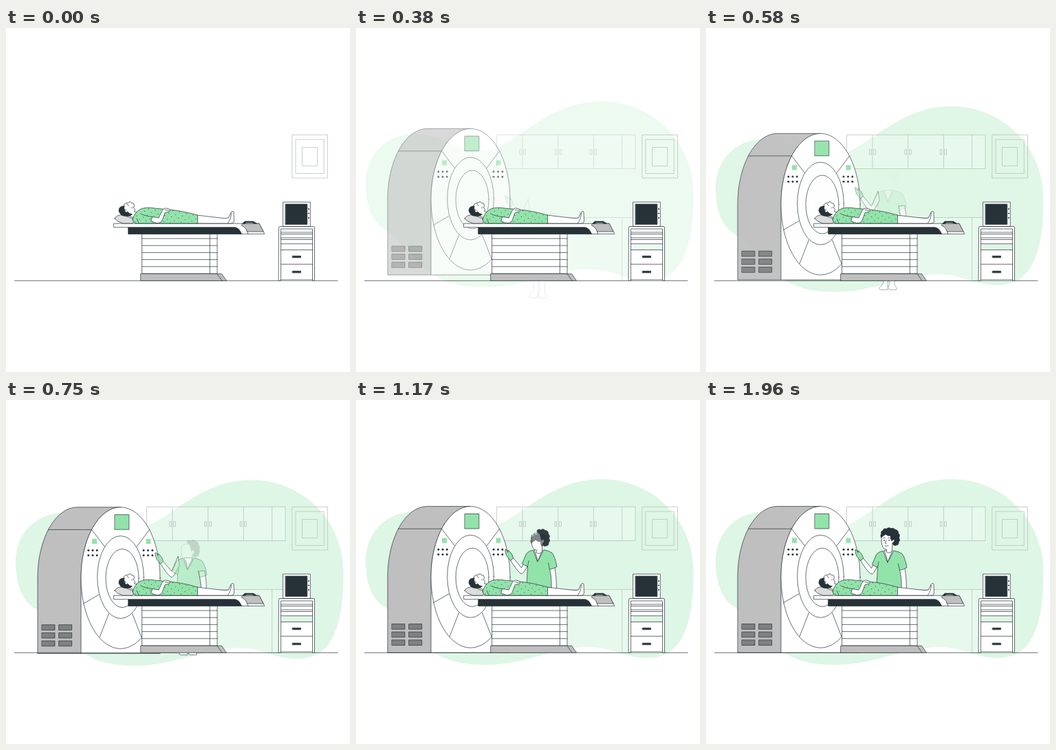
An HTML page for the animation above (2000 ms loop, 500 by 500 pixels).

```html
<!DOCTYPE html>
<html lang="en">
<head>
<meta charset="utf-8">
<title>Scanner room</title>
<style>
html, body { margin: 0; width: 100%; height: 100%; overflow: hidden; background: #fff; }
svg { display: block; width: 100vw; height: 100vh; }
.line { fill: none; stroke: #263238; stroke-width: .7; stroke-linecap: round; stroke-linejoin: round; }
.white { fill: #fff; }
.green { fill: #92e3a9; }
.grey { fill: #bfbfbf; }
.mid { fill: #808080; }
.dark { fill: #263238; }
.pale { fill: none; stroke: #bac4be; stroke-width: .8; }
.veil { fill: #fff; fill-opacity: .25; }
</style>
</head>
<body>
<svg viewBox="0 0 500 500">
  <defs>
    <pattern id="dots" width="10" height="9" patternUnits="userSpaceOnUse" patternTransform="rotate(12)">
      <rect class="green" width="10" height="9"/>
      <circle class="dark" cx="2.5" cy="2.5" r=".6"/>
      <circle class="dark" cx="7.5" cy="7" r=".6"/>
    </pattern>
  </defs>

  <g id="blob">
    <path fill="#def6e5" d="M14 237C13 194 42 162.500 86 162.500C124 162.500 147 187 181 187C231 186.500 272 115 357 115C432 115 490.500 175 490.500 249C490.500 319 478 375 424 375C389 375 371 358 335 359C282 361 246 385 186 385C145 385 116 374 91 350C72 331 61 313 43 302C24 291 15 269 14 237Z"/>
  </g>

  <g id="room" class="pale">
    <path class="veil" d="M204.500 155.300H406V204.500H204.500ZM205 275.500H403V367H205Z" stroke="none"/>
    <path d="M204.500 155.300H406V204.500H204.500ZM242 155V204.500M293.700 155V204.500M345.400 155V204.500M386.700 155V204.500M283 275.500H403M386.700 275.500V367"/>
    <g id="knobs"></g>
  </g>

  <path class="pale" d="M415.800 155.300H467.500V218H415.800ZM421 162H462.300V211.500H421ZM430.500 173.500H452.700V200.500H430.500Z"/>

  <g id="scanner" class="line">
    <path class="white" stroke="none" d="M109 257H166V300H224V367.300H109Z"/>
    <path class="grey" d="M166.500 154.600H103.500A57.500 102.800 0 0 0 46 257.400V367.300H109V257.400A57.500 102.800 0 0 1 166.500 154.600Z"/>
    <path d="M61.300 187.200H124.500M109 367.300H224"/>
    <ellipse class="white" cx="166.500" cy="257.400" rx="57.500" ry="102.800"/>
    <path d="M124.500 187.200L144 212.700M208.500 187.200L189.500 212.700M112.500 294.800L135 281.700M220.500 294.800L198 281.700M136 343.800L149.500 309.300M197 343.800L183.500 309.300"/>
    <ellipse class="white" cx="166.500" cy="256.300" rx="33.800" ry="60"/>
    <ellipse class="white" cx="169" cy="257.800" rx="24" ry="42.500"/>
    <path class="green" d="M158.300 165.500H178.800V187H158.300Z"/>
    <path class="green" stroke="none" d="M125 200.500H132V207.800H125ZM203.500 200.500H210.300V207.800H203.500Z"/>
    <g id="buttons" class="dark" stroke="none"></g>
    <g id="vents" class="mid"></g>
  </g>

  <path class="line" d="M12.500 367.300H482"/>

  <g id="limbs" class="line">
    <path class="white" d="M256 270L258 356L252 363Q251 366 254 366H264L265 300L267 356L265 363Q265 366 268 366H277Q278 363 274 359L279 270Z"/>
    <path class="white" d="M250 223L244 237L240.500 244.500L228.500 230L224.500 233Q232 246 239 252.500Q241.500 254.500 244 250.500L252 237Z"/>
    <path class="green" d="M224.300 233.500L219 227Q216.500 222 216.800 217.500Q218.200 217 219.200 219L221 222L220.800 219Q222.300 218.500 223.500 221L226.500 224.500L228.500 229.800Z"/>
    <path class="white" d="M280 245L282.500 260L284 275H291.500Q291.500 258 289 244Z"/>
  </g>

  <g id="shirt" class="line">
    <path class="green" d="M257 219.500Q250 221 247.500 225L241.500 239Q245 242 249.500 243L249 253Q248.500 262 247.500 274H284Q284.500 258 281.500 247.500Q287 246.500 292 243.500Q289 228 285 223.500Q281 220.500 273 219L264 236Z"/>
    <path class="white" d="M259 219.300Q261.500 224 264 235.500L271 219Z"/>
    <path d="M249.500 243L251 235M281.500 247.500L279.500 238"/>
  </g>

  <g id="head" class="line">
    <path class="dark" d="M263 189Q265 185.500 268.500 188Q272 185 275 188.500Q280 189 279.500 193.500Q283 196.500 280.500 200Q283 204 280 206.500Q280.500 211 276 211Q273 213 271 208L266 197Z"/>
    <path class="white" d="M255.500 196Q254 208 257 213.500Q259 217.500 262.500 217.300L262.300 221Q266 224 270.500 219.500L270.800 208Q274.500 206 273.500 202.500Q272 200 269.500 203L267 193Q259 191 255.500 196Z"/>
  </g>

  <g id="hair">
    <path class="dark" d="M254.500 200.500Q252.500 197 254.500 194.500Q253 190.500 257 189.500Q258 185.500 262 187Q266 184 269 186.500Q274 185.500 275 190Q278 193 275.500 197Q276 202 272.500 203L270 205.500Q267.500 202 268 197.500Q264 198.500 261.500 195.500Q257.500 197.500 254.500 200.500Z"/>
  </g>

  <g id="face" class="line">
    <path d="M257.500 200.800Q259 199.600 260.500 200.700M264.500 200.700Q266.500 199.500 268.500 200.900M261.800 204L260.500 208.500L262.200 208.900M260 212Q262.500 213.300 265.200 211.500"/>
    <g class="dark" stroke="none"><circle cx="259" cy="203.800" r=".9"/><circle cx="266.300" cy="203.800" r=".9"/></g>
  </g>

  <g id="bed" class="line">
    <path class="white" d="M198 299H307V357H198Z"/>
    <path d="M198 306H307M198 316.200H307M198 326.400H307M198 336.600H307M198 346.800H307M296.300 299V357"/>
    <path class="grey" d="M196 357.300H313.500L320.500 367.300H196Z"/>
    <path d="M307 357.300L314 367.300"/>
    <path class="white" d="M157 284.200H368L375.800 299.300H178V289.700H157Z"/>
    <path class="grey" d="M344 284.200H368L374.200 296H350.500Q348.500 289.500 342.500 287Z"/>
    <path d="M350.500 296L352 299.300"/>
    <path class="dark" d="M178 289.700H333Q339 290.500 342.500 299.300H178Z"/>
    <path class="dark" d="M344 284.200L347 281H359.500L364.500 284.200H361L358 282.700H349L347.500 284.200Z"/>
  </g>

  <g id="patient" class="line">
    <path fill="#dcdcdc" d="M158 277Q160 272 169 271.500L187 278Q188 282 183 284H170Q162 282 158 277Z"/>
    <path class="white" d="M277 272L318 276.700L323.500 276L327 268Q329 265 331 267.300L331.500 281Q331 284 327 284H277Z"/>
    <path d="M322.500 283.500Q327 278 327.500 269"/>
    <path class="white" d="M169 262L172 256Q175 253.300 178.500 254L180 252L182 254.300L185.500 255L186.500 258L185.500 261L187.500 264L186.500 267L190 267.500L186 276L178 272.500Q171 270 169 262Z"/>
    <path class="dark" d="M172 259Q166 258.500 164.500 262.500Q163 266 165.500 269Q168 273.500 174 273.300Q181 274 183.500 270.500Q179 270.500 177.500 267.500L174.500 265.500Q170.500 264 172 259Z"/>
    <path class="white" d="M174.500 264.500Q172 263.500 173 266.500Q174.500 269 177 267.500"/>
    <path d="M177 257.500L178.500 258.200M182.500 261.500L184 261M175.500 255.700L177 256.500"/>
    <path fill="url(#dots)" d="M184 278Q187 268 195 263.500Q204 259.500 216 262L237 264Q256 265.500 278.500 272V284H188Q184 282 184 278Z"/>
    <path d="M197 270.500Q203 273.500 213 274.500M190 277L193 283.500"/>
    <path class="white" d="M213 274.500L222 276L226.500 266.500Q228 262.500 232 261.800L238 263.500Q239.500 266 236.500 267.300L231 268.500L227 279.500Q225 284 219 283.500L211 281Z"/>
    <path d="M231 264.500L237 265.500"/>
  </g>

  <g id="cart" class="line">
    <path class="white" d="M403 253H442.300V288.500H403Z"/>
    <path class="dark" d="M406.300 256H437.800V285.500H406.300Z"/>
    <g class="dark" stroke="none"><circle cx="440" cy="263" r="1"/><circle cx="440" cy="269.500" r="1"/><circle cx="440" cy="276" r="1"/></g>
    <path class="white" stroke="none" d="M396.500 289H448.500V367.300H396.500ZM399.500 314V322.500H445.500V314Z" fill-rule="evenodd"/>
    <path d="M396.500 290Q396.500 288.500 398 288.500H447Q448.500 288.500 448.500 290V367.300H445.500V292H399.500V367.300H396.500ZM399.500 297H445.500M399.500 299.500H445.500M399.500 305H445.500M399.500 307.500H445.500M399.500 313.700H445.500M399.500 322.500H445.500M399.500 343.300H445.500M399.500 366H445.500"/>
    <path class="dark" d="M416.500 331.300H428.500V333.800H416.500ZM416.500 353.300H428.500V355.800H416.500Z"/>
  </g>
</svg>
<script>
const LOOP = 2000, SPAN = 1000, HOLD = 130;

// id, start in ms, vertical travel in px
const parts = [
  ["blob", -40, -20],
  ["room", -40, 0],
  ["scanner", -40, -20],
  ["limbs", 190, 30],
  ["shirt", 380, 20],
  ["head", 540, 20],
  ["hair", 750, 20],
  ["face", 960, 20]
].map(([id, start, travel]) => ({ el: document.getElementById(id), start, travel }));

function add(id, tag, attrs) {
  const el = document.createElementNS("http://www.w3.org/2000/svg", tag);
  for (const key in attrs) el.setAttribute(key, attrs[key]);
  document.getElementById(id).append(el);
}

for (const x of [237.7, 243.8, 289, 295.7, 340.3, 346.8])
  add("knobs", "rect", { x, y: 176.8, width: 2.6, height: 7 });
for (const cx of [119.8, 126, 132.2, 200, 206.5, 212.8])
  for (const cy of [217.2, 224.5]) add("buttons", "circle", { cx, cy, r: 1.5 });
for (const x of [52.3, 77])
  for (const y of [325.5, 337.1, 348.8]) add("vents", "rect", { x, y, width: 18.7, height: 7.7 });

const curve = (a, b, s) => 3 * a * s * (1 - s) ** 2 + 3 * b * s * s * (1 - s) + s ** 3;

// cubic-bezier(.36, -.01, .5, 1.38)
function ease(x) {
  if (x <= 0) return 0;
  if (x >= 1) return 1;
  let lo = 0, hi = 1;
  for (let i = 0; i < 24; i++) {
    const mid = (lo + hi) / 2;
    if (curve(.36, .5, mid) < x) lo = mid; else hi = mid;
  }
  return curve(-.01, 1.38, lo);
}

function draw(now) {
  const t = now % LOOP;
  for (const { el, start, travel } of parts) {
    const p = t < HOLD ? 0 : ease((t - start) / SPAN);
    el.setAttribute("opacity", Math.max(0, Math.min(1, p)));
    el.setAttribute("transform", `translate(0 ${travel * (1 - p)})`);
  }
}

function tick() {
  draw(performance.now());
  requestAnimationFrame(tick);
}
tick();
</script>
</body>
</html>
```
